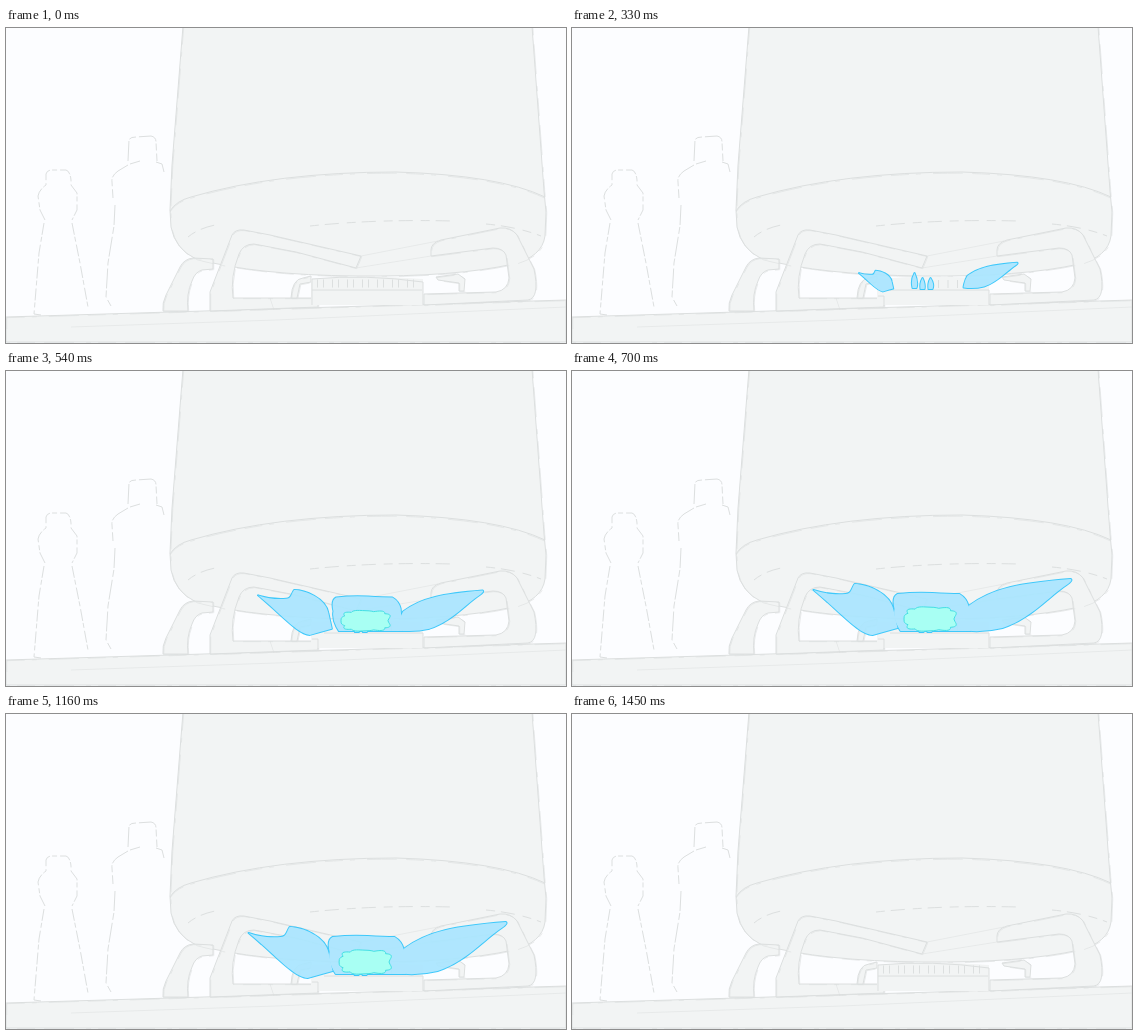
Write an HTML page that moves like this. It is 560 by 315 pixels and loops after 2000 ms.

```html
<!DOCTYPE html>
<html lang="en">
<head>
<meta charset="utf-8">
<title>Gas burner</title>
<style>
  html, body { margin: 0; width: 100%; height: 100%; overflow: hidden; background: #fcfdff; }
  svg { display: block; width: 100vw; height: 100vh; }
  path { stroke-linejoin: round; vector-effect: non-scaling-stroke; }
  .solid { fill: #f2f4f4; stroke: #dcdfdf; }
  .line { fill: none; stroke: #dcdfdf; }
  .rough { opacity: .6; stroke-dasharray: 18 7 5 12 30 9; }
  .faint { opacity: .5; }
  .outline { stroke: #31c5fb; stroke-width: 2; }
  .body { fill: #aae6ff; }
  .core { fill: #a8fff3; stroke: #43dfe4; }
</style>
</head>
<body>
<svg viewBox="0 0 560 315">
  <defs>
    <g id="scene">
      <path d="M0 289L560 272V314H0Z"/>
      <path d="M177 -2L166 137 164 182 165 199Q169 221 190 231Q250 247 350 248T507 236Q536 229 539 208L540 184 538 163 526 -2Z"/>
      <path d="M157 283Q156 275 160 267L174 239Q178 231 187 230L207 231V241L196 242Q189 244 186 253Q180 266 182 283Z"/>
      <path d="M204 283V264L226 207Q229 201 238 202L264 207 355 228 350 240 290 224 248 216Q237 216 233 226Q224 249 227 270H312V279Z"/>
      <path d="M425 222Q425 215 435 212L494 200Q505 199 511 207L528 241Q534 270 522 272L418 277V266L490 264Q502 262 503 250L500 227Q497 220 487 220L425 228Z"/>
      <path d="M285 270Q286 251 297 250L305 248V254L294 256 291 270Z"/>
      <path d="M430 249L452 246 459 251 458 263H453V255L432 252Z"/>
    </g>
    <g id="flames">
      <path id="left" d="M243 219C252 222 262 224 275 223C281 223 281 217 284 213C296 213 320 222 323 239L327 257Q316 260 302 264C288 263 272 243 243 219Z"/>
      <path id="middle" d="M330 260Q322 248 324 238Q321 226 327 223Q345 221 362 222T389 223Q396 227 398 235L400 260Z"/>
      <path id="right" d="M390 258Q392 245 398 235C422 217 450 212 500 208Q503 209 496 214C478 226 460 248 432 257Q412 262 390 259Z"/>
      <g id="jets">
        <path d="M343 245Q347 254 345 260H341Q339 252 343 245Z"/>
        <path d="M351 250Q354 256 353 261H349Q348 255 351 250Z"/>
        <path d="M359 250Q363 256 361 261H357Q356 255 359 250Z"/>
      </g>
    </g>
  </defs>

  <use href="#scene" class="solid"/>
  <use href="#scene" class="line rough" x=".8" y=".7"/>
  <g class="line">
    <path id="rim" d="M164 183Q170 173 185 169Q270 144 390 144Q493 147 539 169"/>
    <use href="#rim" class="rough" y="1.2"/>
    <path stroke-dasharray="9 6 14 8" d="M182 209Q194 199 215 196M304 198Q370 191 446 193M480 196Q512 199 535 208"/>
    <path stroke-dasharray="12 2 5 3" d="M39 192L34 182 32 168Q33 162 40 157V146Q41 142 46 142H60Q64 143 65 152V157L71 165V182L66 192M38 195L33 225 28 286 35 287M66 195L74 235 82 279"/>
    <path stroke-dasharray="20 2 7 3" d="M122 133L123 112Q124 109 130 109L145 108Q150 109 150 114L151 133M122 137L112 143Q105 148 106 154L107 170M109 177L108 198 102 235 100 269 105 278M124 136L134 133M150 134L156 136 158 144"/>
    <path class="faint" d="M65 299L270 292 560 279M355 228L432 213M350 240L425 228M264 270L268 282"/>
  </g>
  <path class="solid" stroke-opacity="0" d="M305 251Q360 246 417 251V277H305Z"/>
  <g id="unlit" class="line">
    <path d="M306 277V251Q360 246 417 254V277M306 262H416"/>
    <path d="M311 255.5H412" stroke-width="8" stroke-dasharray="1 5 1 8"/>
  </g>
  <g id="lit" class="line">
    <path d="M306 268H312V278M318 262H417V277"/>
    <path d="M366 256H386" stroke-width="8" stroke-dasharray="1 8.5"/>
  </g>

  <g id="fire">
    <g opacity=".93">
      <use href="#flames" class="outline"/>
      <use href="#flames" class="body"/>
    </g>
    <path id="core" class="core"/>
  </g>
</svg>
<script>
const FPS = 24, LOOP = 2000, IGNITE = 200, CUT = 1208, OUT = 1458;
const el = id => document.getElementById(id);
const clamp = v => Math.min(1, Math.max(0, v));
const easeOut = v => 1 - (1 - v) ** 3;

// Scales a part about its root; a part without size is hidden.
function grow(id, x, y, kx, ky = kx) {
  el(id).style.display = kx * ky > 0 ? '' : 'none';
  el(id).setAttribute('transform', `translate(${x} ${y}) scale(${kx} ${ky}) translate(${-x} ${-y})`);
}

// Rounded box with a bumpy edge.
function cloud(x, y, rx, ry) {
  const soft = v => Math.sign(v) * Math.abs(v) ** .6;
  let d = '';
  for (let i = 0; i < 90; i++) {
    const a = i / 90 * 2 * Math.PI, r = .9 + .12 * Math.abs(Math.sin(4.5 * a));
    d += `${i ? 'L' : 'M'}${x + rx * r * soft(Math.cos(a))} ${y + ry * r * soft(Math.sin(a))}`;
  }
  return d + 'Z';
}

function draw(now) {
  const t = Math.floor((now % LOOP + 9.9) * FPS / 1000) * 1000 / FPS;
  const open = clamp((t - IGNITE) / 500);
  const close = clamp((OUT - t) / (OUT - CUT));
  const on = open * close > 0;
  const spread = easeOut(clamp((t - 350) / 350)) * close;
  const core = easeOut(clamp((t - 400) / 300)) * close;

  grow('left', 318, 263, Math.sin(open * Math.PI / 2) * close ** 3);
  grow('right', 394, 260, on ? (.3 + .7 * open) * close ** .8 : 0);
  grow('middle', 362, 261, spread);
  grow('jets', 351, 261, 1, clamp(open * 4) * close);
  grow('core', 360, 260, core ? .6 + .4 * core : 0, core);

  const sway = Math.cos((t - 700) / 280 * Math.PI) ** 2;
  el('fire').setAttribute('transform', `translate(${-1.5 * sway} 0)`);
  el('fire').style.display = el('lit').style.display = on ? '' : 'none';
  el('unlit').style.display = on ? 'none' : '';
}

el('core').setAttribute('d', cloud(360, 248, 26, 12));
const start = performance.now();
(function tick() {
  draw(performance.now() - start);
  requestAnimationFrame(tick);
})();
</script>
</body>
</html>
```
